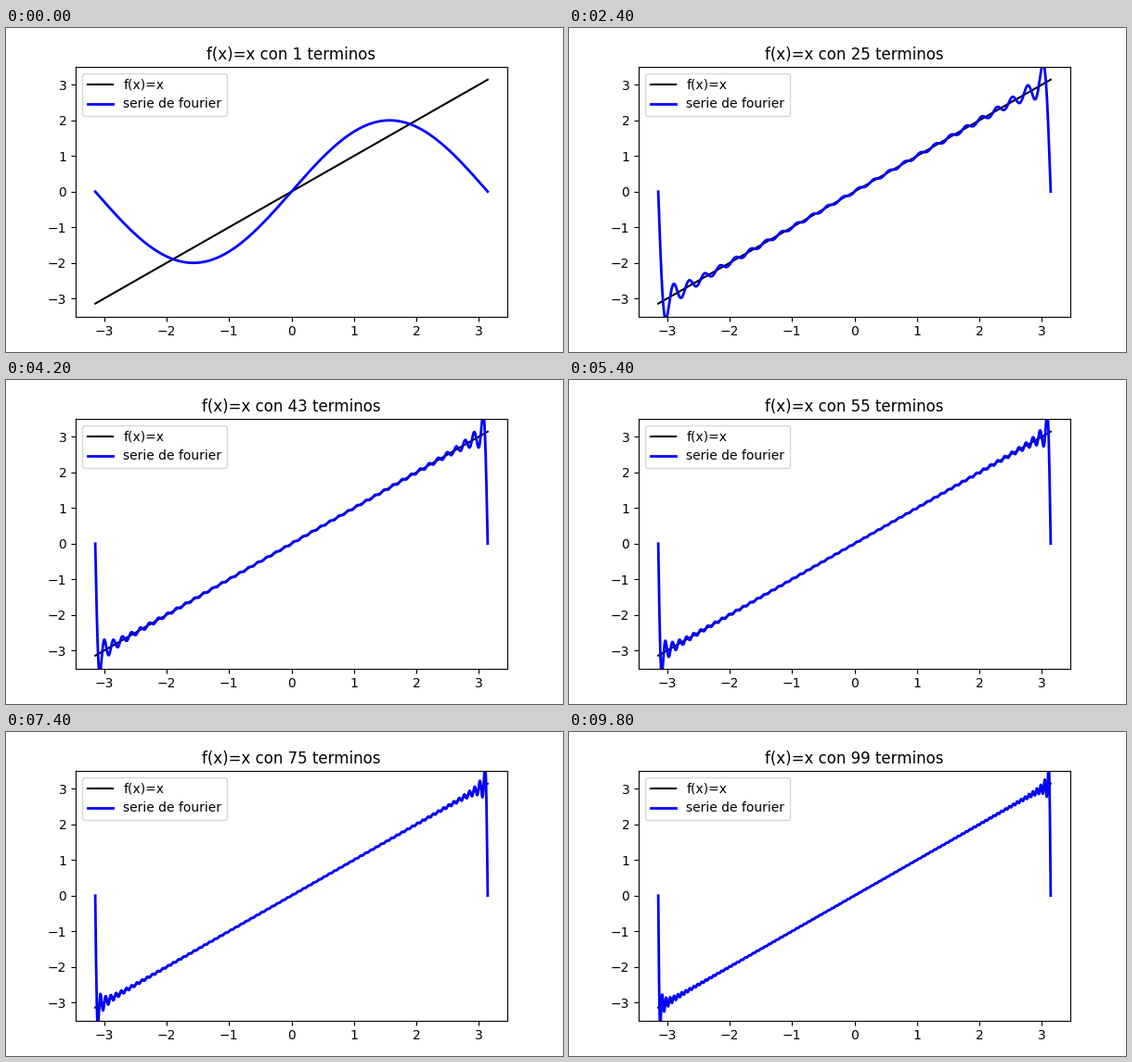
Write a matplotlib script that moves like this. It is 600 px wide and 350 px high and loops after 10 s.

```python
import numpy as np
import matplotlib.pyplot as plt
from matplotlib.animation import FuncAnimation

FRAMES = 50
INTERVAL = 200  # ms

x = np.linspace(-np.pi, np.pi, 1000)


def fourier(terms):
    """Partial Fourier sum of f(x) = x on [-pi, pi]."""
    n = np.arange(1, terms + 1)[:, None]
    return (2 * (-1.0) ** (n + 1) / n * np.sin(n * x)).sum(axis=0)


fig, ax = plt.subplots(figsize=(6, 3.5), dpi=100)
ax.plot(x, x, color="black", lw=1.5, label="f(x)=x")
curve, = ax.plot(x, fourier(1), color="blue", lw=2, label="serie de fourier")
ax.set_ylim(-3.5, 3.5)
ax.legend(loc="upper left")
title = ax.set_title("")


def update(i):
    terms = 2 * i + 1
    curve.set_ydata(fourier(terms))
    title.set_text(f"f(x)=x con {terms} terminos")
    return curve, title


anim = FuncAnimation(fig, update, frames=FRAMES, interval=INTERVAL,
                     init_func=lambda: update(0), repeat=True, repeat_delay=0)
plt.show()
```
